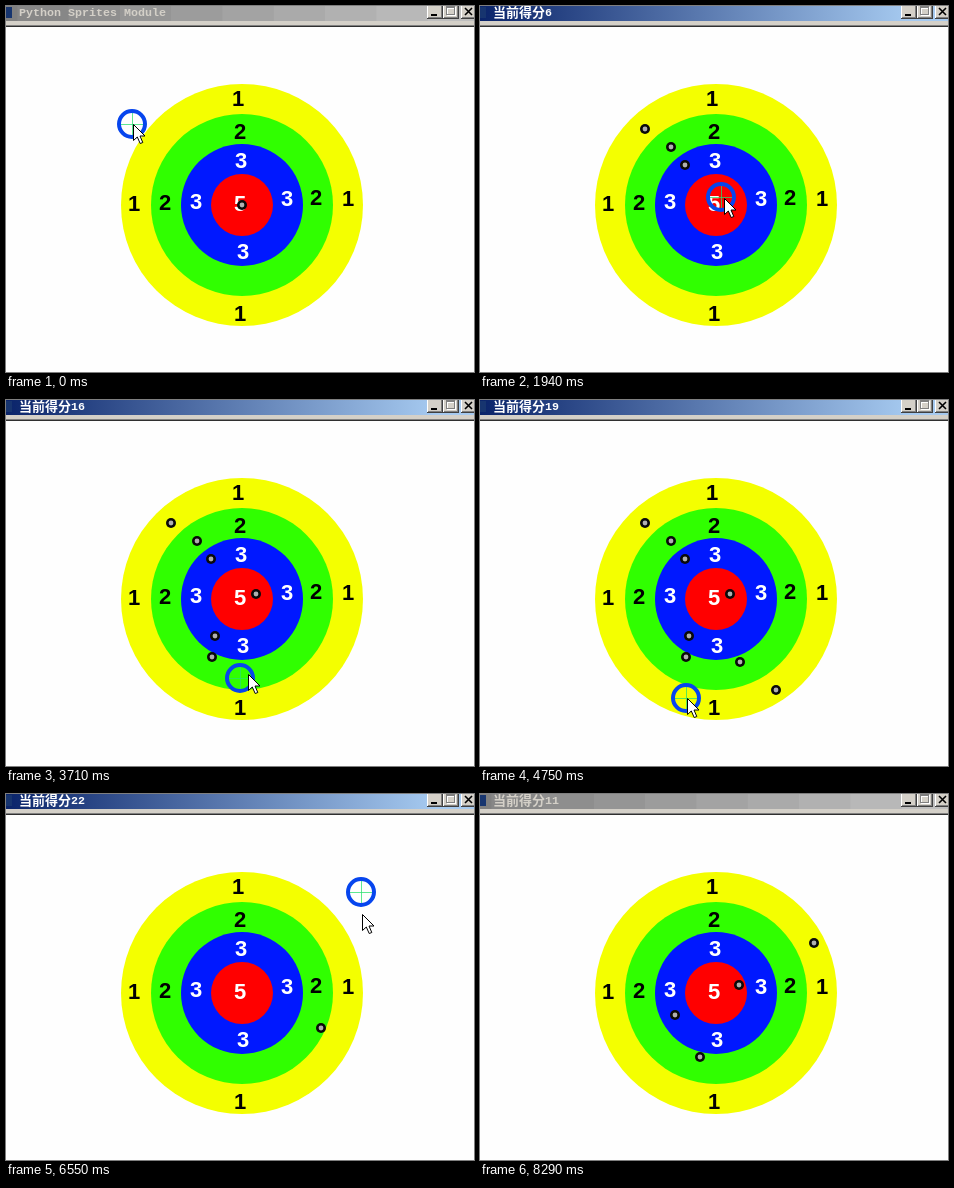
An HTML page with a canvas that plays this animation: 468 by 366 pixels, repeating every 8850 ms.

```html
<!DOCTYPE html>
<html lang="zh">
<head>
<meta charset="utf-8">
<title>Target practice</title>
<style>
html, body { margin: 0; width: 100%; height: 100%; overflow: hidden; background: #fefefe; }
canvas { display: block; }
</style>
</head>
<body>
<canvas id="stage" width="468" height="366"></canvas>
<script>
const ctx = document.getElementById('stage').getContext('2d');
const W = 468, H = 366, LOOP = 8850;
const MONO = '"Liberation Mono", monospace';
const CJK = '"Noto Sans CJK SC", "Noto Sans CJK", sans-serif';

// Bursts of screen updates: start, end, number of steps
const bursts = [
  [60, 940, 15], [990, 1410, 7], [1590, 2110, 10], [2420, 3170, 14],
  [3410, 3820, 8], [4010, 4870, 14], [4930, 5210, 6], [5390, 6230, 14],
  [6550, 6950, 7], [7130, 8010, 14], [8070, 8290, 4]
];

// Sight path: time, x, y
const path = [
  [0, 126, 118], [240, 126, 118], [480, 165, 123], [620, 165, 123],
  [935, 191, 141], [1140, 191, 141], [1400, 205, 159], [1650, 205, 159],
  [1937, 241, 191], [2100, 250, 194], [2500, 250, 194], [2780, 209, 236],
  [2990, 209, 236], [3160, 206, 257], [3500, 206, 257], [3703, 234, 278],
  [3810, 260, 262], [4070, 260, 262], [4270, 296, 290], [4450, 296, 290],
  [4735, 206, 298], [4930, 206, 298], [5200, 315, 234], [5480, 315, 234],
  [6220, 355, 98], [6550, 355, 98], [6580, 355, 120], [6790, 334, 149],
  [7160, 334, 149], [7320, 259, 191], [7400, 259, 191], [7540, 195, 221],
  [7630, 195, 221], [7740, 220, 263], [7820, 220, 263], [8005, 417, 351],
  [8060, 417, 351], [8200, 490, 395]
];

// Shots: time, x, y, score afterwards, whether older holes vanish
const shots = [
  [0, 236, 199, 0], [540, 165, 123, 1, true], [990, 191, 141, 3],
  [1590, 205, 159, 6], [2420, 250, 194, 11], [2930, 209, 236, 14],
  [3410, 206, 257, 16], [4010, 260, 262, 18], [4390, 296, 290, 19],
  [4865, 206, 298, 20], [5390, 315, 234, 22, true],
  [6880, 334, 149, 1, true], [7350, 259, 191, 6], [7590, 195, 221, 9],
  [7780, 220, 263, 11]
];

const rings = [[121, '#f4ff00'], [91, '#30ff00'], [61, '#0018ff'], [31, '#ff0000']];
const labels = [
  [1, 232, 92], [2, 234, 125], [3, 235, 154], [5, 234, 197], [3, 237, 245],
  [1, 234, 307], [1, 128, 197], [2, 159, 196], [3, 190, 195],
  [3, 281, 192], [2, 310, 191], [1, 342, 192]
];

function steppedTime(t) {
  let held = 0;
  for (const [start, end, count] of bursts) {
    if (t < start) break;
    const gap = (end - start) / (count - 1);
    held = Math.min(end, start + Math.floor((t - start) / gap) * gap);
  }
  return held;
}

function sightAt(t) {
  const i = path.findIndex(p => p[0] > t);
  if (i < 0) return path[path.length - 1].slice(1);
  const [t0, x0, y0] = path[i - 1], [t1, x1, y1] = path[i];
  const k = (t - t0) / (t1 - t0);
  return [Math.round(x0 + (x1 - x0) * k), Math.round(y0 + (y1 - y0) * k)];
}

function rect(x, y, w, h, color) {
  ctx.fillStyle = color;
  ctx.fillRect(x, y, w, h);
}

function disc(x, y, r, color) {
  ctx.fillStyle = color;
  ctx.beginPath();
  ctx.arc(x, y, r, 0, 7);
  ctx.fill();
}

function text(str, x, y, font, color, align = 'left') {
  ctx.font = font;
  ctx.fillStyle = color;
  ctx.textAlign = align;
  ctx.fillText(str, x, y);
}

function strokeLines(lines, color, width) {
  ctx.strokeStyle = color;
  ctx.lineWidth = width;
  ctx.beginPath();
  for (const [x0, y0, x1, y1] of lines) {
    ctx.moveTo(x0, y0);
    ctx.lineTo(x1, y1);
  }
  ctx.stroke();
}

function button(x) {
  rect(x, -2, 16, 15, '#404040');
  rect(x, -2, 15, 14, '#ffffff');
  rect(x + 1, -1, 14, 13, '#808080');
  rect(x + 1, -1, 13, 12, '#d4d0c8');
}

function drawTitleBar(active, score) {
  if (active) {
    const shade = ctx.createLinearGradient(0, 0, 430, 0);
    shade.addColorStop(0, '#0a246a');
    shade.addColorStop(1, '#a6caf0');
    rect(0, 0, W, 15, shade);
  } else {
    for (let i = 0; i < 10; i++) {
      const v = 128 + i * 7;
      rect(i ? i * 51.3 - 40 : 0, 0, 52, 15, `rgb(${v},${v},${v})`);
    }
  }
  rect(0, 15, W, 4, '#d4d0c8');
  rect(0, 19, W, 1, '#808080');
  rect(0, 20, W, 1, '#303030');
  rect(0, 1, 6, 11, '#17356f');

  const ink = active ? '#ffffff' : '#d4d0c8';
  const mono = `bold 11.67px ${MONO}`;
  if (score) {
    text('当前得分', 13, 10.5, `bold 13px ${CJK}`, ink);
    text(score, 65, 10, mono, ink);
  } else {
    text('Python Sprites Module', 13, 10, mono, ink);
  }

  [421, 437, 455].forEach(button);
  rect(425, 8, 6, 2, '#000');
  ctx.lineWidth = 1;
  for (const [d, color] of [[1, '#ffffff'], [0, '#808080']]) {
    ctx.strokeStyle = color;
    ctx.strokeRect(440.5 + d, 0.5 + d, 8, 8);
    rect(440 + d, 1 + d, 9, 1, color);
  }
  strokeLines([[459, 2, 466, 9], [466, 2, 459, 9]], '#000', 1.6);
}

function drawTarget() {
  for (const [r, color] of rings) disc(236, 199, r, color);
  for (const [n, x, y] of labels) {
    text(n, x, y + 8, 'bold 22px "Liberation Sans", sans-serif', n < 3 ? '#000' : '#fff', 'center');
  }
}

function drawHole(x, y) {
  disc(x, y, 5, '#0a0a0a');
  disc(x, y, 2.4, '#b0b0b0');
}

function drawSight(x, y) {
  strokeLines([[x - 12, y + .5, x + 12, y + .5], [x + .5, y - 12, x + .5, y + 12]], 'rgba(40,225,110,.75)', 1);
  ctx.strokeStyle = '#0645ee';
  ctx.lineWidth = 4;
  ctx.beginPath();
  ctx.arc(x, y, 13, 0, 7);
  ctx.stroke();
}

function drawCursor(x, y) {
  const arrow = new Path2D('M.5 .5V16.5L4.3 13L7.2 19.5L9.8 18.5L7 12H12Z');
  ctx.save();
  ctx.translate(x, y);
  ctx.fillStyle = '#fff';
  ctx.fill(arrow);
  ctx.strokeStyle = '#000';
  ctx.lineWidth = 1;
  ctx.stroke(arrow);
  ctx.restore();
}

function draw(time) {
  const t = steppedTime(time % LOOP);
  let holes = [], score = 0;
  for (const [when, x, y, total, clears] of shots) {
    if (when > t) break;
    if (clears) holes = [];
    holes.push([x, y]);
    score = total;
  }
  rect(0, 0, W, H, '#fefefe');
  drawTarget();
  for (const [x, y] of holes) drawHole(x, y);
  drawSight(...sightAt(t));
  const [cx, cy] = sightAt(t + 30);
  drawCursor(cx + 1, cy);
  drawTitleBar(t >= 60 && t < 8285, score);
}

const began = performance.now();
function tick() {
  draw(performance.now() - began);
  requestAnimationFrame(tick);
}
tick();
</script>
</body>
</html>
```
